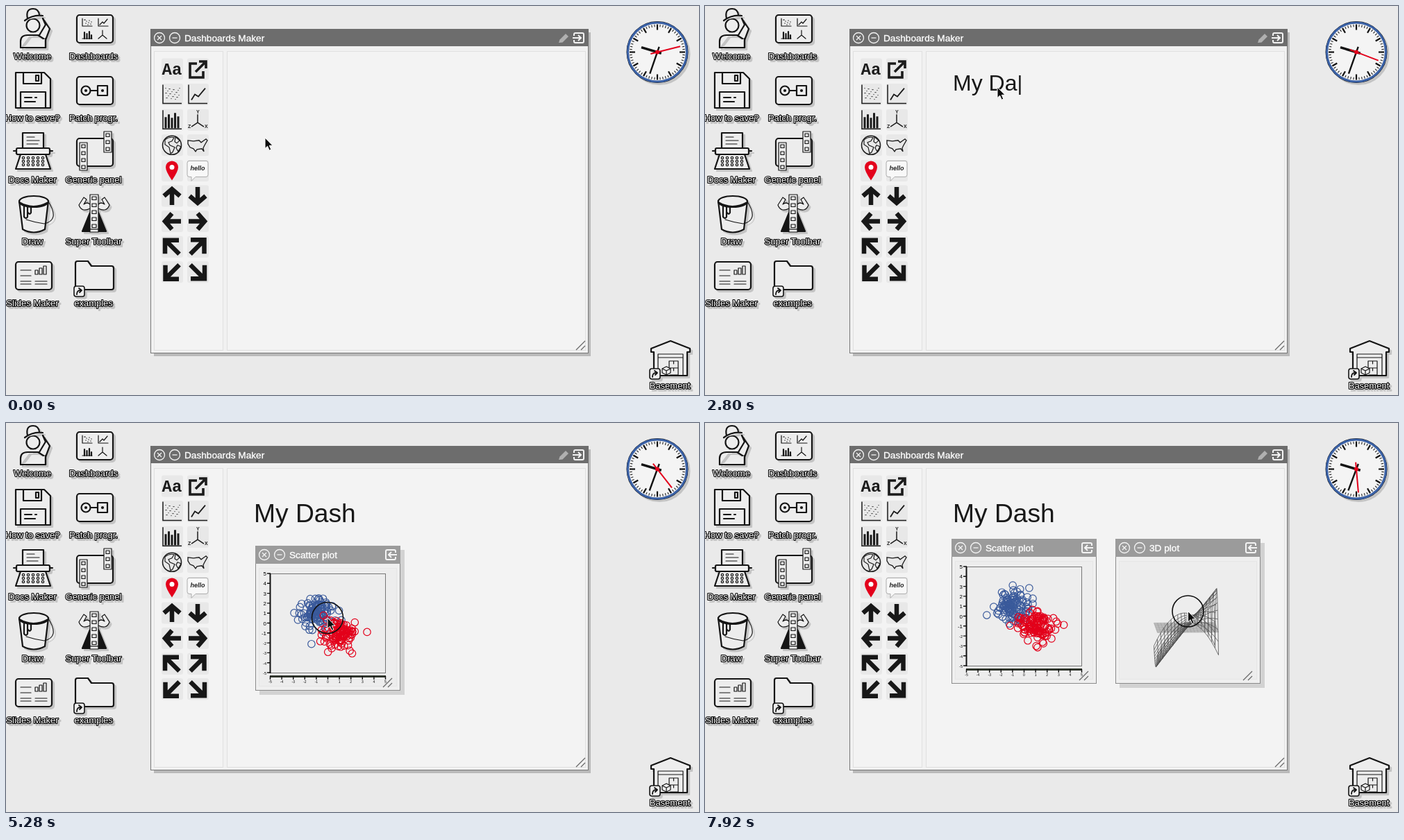
An HTML page for the animation above (8000 ms loop, 998 by 561 pixels).

```html
<!DOCTYPE html>
<html lang="en">
<head>
<meta charset="utf-8">
<title>Desktop</title>
<style>
html, body { margin: 0; width: 100%; height: 100%; overflow: hidden; background: #eaeaea; }
svg { display: block; width: 100vw; height: 100vh; }
text { font-family: "Liberation Sans", Arial, sans-serif; white-space: pre; }
.icon { fill: none; stroke: #151515; stroke-width: 2.2; stroke-linejoin: round; stroke-linecap: round; filter: drop-shadow(3px 3px 0 #c4c4c4); }
.pale { fill: #ededed; }
.thin { stroke-width: 1.2; }
.dark { fill: #151515; }
.label { font-size: 13px; text-anchor: middle; fill: #fff; stroke: #000; stroke-width: 2.2px; stroke-linejoin: round; paint-order: stroke; filter: drop-shadow(3px 3px 0 #c4c4c4); }
.title { font-size: 13.65px; fill: #fff; stroke: #fff; stroke-width: .35px; }
.glyph { fill: none; stroke: #f4f4f4; stroke-width: 1.3; }
.tool { fill: none; stroke: #1b1b1b; stroke-width: 1.5; }
.grip { stroke: #6a6a6a; stroke-width: 1.3; fill: none; }
</style>
</head>
<body>
<svg id="stage" viewBox="0 0 998 561" xmlns="http://www.w3.org/2000/svg"></svg>
<script>
const stage = document.getElementById('stage');
const $ = id => document.getElementById(id);
const range = n => [...Array(n).keys()];
const rect = (x, y, w, h, r = 0, attrs = '') =>
  `<rect x="${x}" y="${y}" width="${w}" height="${h}" rx="${r}" ${attrs}/>`;
const path = (d, attrs = '') => `<path d="${d}" ${attrs}/>`;
const circle = (x, y, r, attrs = '') => `<circle cx="${x}" cy="${y}" r="${r}" ${attrs}/>`;
const at = (x, y, body, attrs = '') => `<g transform="translate(${x} ${y})" ${attrs}>${body}</g>`;

function random(seed) {
  let s = seed * 7919 + 17;
  return () => {
    s = s + 0x6D2B79F5 | 0;
    let v = Math.imul(s ^ s >>> 15, 1 | s);
    v = v + Math.imul(v ^ v >>> 7, 61 | v) ^ v;
    return ((v ^ v >>> 14) >>> 0) / 4294967296;
  };
}

// Desktop icons, drawn around their own centre
const link = at(-29, 15, rect(0, 0, 15, 15, 3, 'class="pale" stroke-width="1.6"') +
  path('M4 12Q4 6 9 6M7 3L11 6L8 9', 'stroke-width="1.8"'));

const strip = (x, y, n, w = 11) => rect(x, y, w, n * 10, 0, 'class="pale thin"') +
  range(n).map(i => rect(x + 3, y + 3 + i * 10, w - 6, 4.5, 0, 'class="thin"')).join('');

const card = rect(-25, -20, 52, 40, 4, 'class="pale"');

const art = {
  person: path('M-18 27V18Q-18 9 -8 9H7L18 16L24 0L14 -15', 'class="pale"') +
    path('M-18 27H18V14', 'class="pale"') +
    circle(0, -5, 9.5, 'class="pale"') +
    path('M-12 -12Q0 -21 14 -19M-8 -15Q-11 -29 0 -29Q8 -29 9 -20', 'class="pale"') +
    path('M14 -15L18 -6L9 9M18 16V27', ''),
  board: card + path('M-17 -15V-4H-3M6 -15V-4H20M8 -6L12 -10L14 -8L19 -14', 'class="thin"') +
    range(9).map(i => circle(-14 + i * 29 % 11, -13 + i * 17 % 8, .7, 'class="dark" stroke="none"')).join('') +
    path('M-17 14H-3', 'class="thin"') + path('M-14 14V5M-10.500 14V7M-7 14V4M-4 14V9', '') +
    path('M12 2V9L6 14M12 9L18 14', 'class="thin"'),
  floppy: path('M-25 -26H16L25 -17V25H-25Z', 'class="pale"') +
    path('M-14 -26V-10H12V-26M4 -22V-14H8V-22ZM-18 25V2H18V25', '') +
    path('M-12 10H-2M3 10H5M-12 16H3'),
  patch: card + circle(-12, 0, 6.5) + path('M-5 0H5') + rect(5, -7, 14, 14) +
    circle(-12, 0, 1, 'class="dark"') + circle(12, 0, 1, 'class="dark"'),
  typewriter: rect(-15, -28, 30, 24, 0, 'class="pale"') +
    path('M-9 -22H2M-9 -17H9M-9 -12H7', 'class="thin"') +
    rect(-24, -6, 48, 9, 2, 'class="pale"') +
    path('M-18 3H18L25 24H-25Z', 'class="pale"') +
    range(15).map(i => circle(-14 + i % 5 * 7, 8 + Math.floor(i / 5) * 5, 1.7, 'class="thin"')).join('') +
    path('M-28 -2H-24M24 -2H28'),
  panel: card + strip(-21, -14, 4) + strip(14, -30, 3),
  bucket: path('M-20 -19L-15 22Q1 31 17 22L22 -19', 'class="pale"') +
    `<ellipse cx="1" cy="-18" rx="21" ry="8" class="pale"/>` +
    path('M-20 -17Q0 -5 22 -17M-13 -12V4Q-10 8 -8 4V-10M-8 -3Q-5 2 -3 -2V-9', '') +
    path('M22 -18Q39 9 16 14Q2 12 -10 8', 'class="thin"'),
  hero: path('M-6 -2L-17 25H-6ZM6 -2L17 25H6Z', 'class="dark"') +
    path('M-6 -8Q-18 -2 -22 -13L-15 -24L-11 -21L-15 -14Q-10 -18 -6 -14M6 -8Q18 -2 22 -13L15 -24L11 -21L15 -14Q10 -18 6 -14', 'class="pale thin"') +
    strip(-6, -28, 5, 12) + rect(-6, 22, 12, 4, 0, 'class="pale thin"'),
  slides: card + path('M-18 -8H-3M-18 0H-3M-18 8H-3M3 8H20M3 12H20M-18 12H-3', 'class="thin"') +
    path('M3 -2V-8H7V-2ZM9 -2V-11H13V-2ZM15 -2V-14H19V-2Z', 'class="thin"'),
  folder: path('M-27 19V-18Q-27 -21 -24 -21H-9L-4 -14H25Q28 -14 28 -11V17Q28 20 25 20H-27Z', 'class="pale"') + link,
  garage: path('M-28 -9V-14L0 -25L28 -14V-9H24V25H-24V-9Z', 'class="pale"') +
    path('M-18 25V-6H18V25M-18 -1H18', 'class="thin"') +
    path('M-2 4H11V24M-2 4V13M11 14H-2M4.500 4V8M4.500 14V18M-12 15L-6 12L0 15V21L-6 24L-12 21ZM-12 15L-6 18L0 15M-6 18V24M-1 24H11', 'class="thin"') +
    at(-1, 0, link)
};

const icon = (x, y, kind, label, gap = 43.5) =>
  at(x, y, art[kind], 'class="icon"') + `<text class="label" x="${x - 1}" y="${y + gap}">${label}</text>`;

const desktop = [
  ['person', 'Welcome', 'board', 'Dashboards'],
  ['floppy', 'How to save?', 'patch', 'Patch progr.'],
  ['typewriter', 'Docs Maker', 'panel', 'Generic panel'],
  ['bucket', 'Draw', 'hero', 'Super Toolbar'],
  ['slides', 'Slides Maker', 'folder', 'examples']
].map(([a, la, b, lb], i) => icon(39, 33 + i * 89, a, la) + icon(127, 33 + i * 89, b, lb)).join('') +
  icon(957, 508, 'garage', 'Basement');

// Clock
const hand = (id, d, w, color = '#111') =>
  path(d, `id="${id}" stroke="${color}" stroke-width="${w}"`);
const clock = at(938, 66.5,
  circle(0, 0, 43.5, 'fill="#f4f4f4" stroke="#111" stroke-width="2" style="filter:drop-shadow(3px 3px 0 #c4c4c4)"') +
  circle(0, 0, 42.5, 'fill="none" stroke="#3a61a6" stroke-width="3.2"') +
  range(60).map(i => path(`M0 -40V${i % 5 ? -36.5 : -32}`,
    `stroke="#111" stroke-width="${i % 5 ? 1 : 2.2}" transform="rotate(${i * 6})"`)).join('') +
  hand('hour', 'M0 6V-24', 3.6) + hand('minute', 'M0 8V-33', 2.4) +
  hand('second', 'M0 10V-34', 2, '#e3001b') + circle(0, 0, 3, 'fill="#e3001b"'));

// Windows
const buttons = at(13, 13, circle(0, 0, 7.5) + path('M-3 -3L3 3M3 -3L-3 3')) +
  at(35, 13, circle(0, 0, 7.5) + path('M-3.500 0H3.500'));
const exit = dir => `<g stroke-width="2" transform="scale(${dir} 1)">` +
  path('M-7 -3V-5Q-7 -7 -5 -7H5Q7 -7 7 -5V5Q7 7 5 7H-5Q-7 7 -7 5V3M-9 0H3M-1 -4L3 0L-1 4') + '</g>';
const grip = (x, y) => path(`M${x - 13} ${y}L${x} ${y - 13}M${x - 6} ${y}L${x} ${y - 6}`, 'class="grip"');
const edge = 'fill="#f3f3f3" stroke="#e0e0e0"';

const mainWindow = at(208, 33,
  rect(5, 5, 629, 467, 0, 'fill="#b9b9b9"') +
  rect(.5, .5, 630, 467, 0, 'fill="#f1f1f1" stroke="#777"') +
  rect(0, 0, 631, 25, 0, 'fill="#6d6d6d"') +
  rect(5.5, 32.5, 99, 431, 0, edge) + rect(110.5, 32.5, 516, 431, 0, edge) +
  `<g class="glyph">${buttons}${at(617, 13, exit(1))}</g>` +
  path('M588 20L589.500 15.500L598 7L602 11L593.500 19.500Z', 'fill="#b0b0b0"') +
  `<text class="title" x="49" y="18">Dashboards Maker</text>` + grip(626, 463));

const miniWindow = (id, title, body) => `<g id="${id}">` +
  rect(6, 6, 209, 209, 0, `id="${id}Shade" fill="#d2d2d2"`) +
  rect(.5, .5, 208, 208, 0, 'fill="#efefef" stroke="#8a8a8a"') +
  rect(0, 0, 209, 26, 0, 'fill="#9b9b9b"') +
  rect(5.5, 32.5, 198, 170, 0, 'fill="#ededed" stroke="#e6e6e6"') +
  `<g class="glyph">${buttons}${at(195, 13, exit(-1))}</g>` +
  `<text class="title" x="49" y="18">${title}</text>${body}${grip(197, 204)}</g>`;

const axes = rect(21.5, 40.5, 166, 143, 0, 'fill="none" stroke="#777"') +
  path('M21.500 40V184', 'stroke="#111" stroke-width="2"') +
  path('M21 188.500H188', 'stroke="#30352c" stroke-width="3"') +
  range(11).map(i => {
    const x = 21.5 + i * 16.6, y = 40 + i * 14.3;
    return path(`M17 ${y}H22M${x} 188V193`, 'stroke="#111" stroke-width="1.4"') +
      `<text x="16" y="${y + 3}" font-size="${i < 7 ? 8 : 5.5}" text-anchor="end">${5 - i}</text>` +
      `<text x="${x}" y="197.500" font-size="5" text-anchor="middle">${i - 5}</text>`;
  }).join('');

// Toolbar
const arrow = (turn, diagonal) => path(diagonal
  ? 'M-10 10V-9.500H10M-9 -9L10.500 10.500' : 'M-11.500 0L0 -10L11.500 0M0 -9V13',
  `stroke-width="6.500" stroke="#171717" transform="rotate(${turn})"`);
const plotDots = range(26).map(i => circle(-9 + i * 37 % 21, -9 + i * 23 % 17, .7, 'fill="#222" stroke="none"')).join('');
const frame = path('M-13 -14V13H14');
const tools = [
  `<text y="8" text-anchor="middle" font-weight="bold" fill="#1b1b1b" stroke="none" style="font:bold 24px 'Liberation Mono',monospace">Aa</text>`,
  path('M-1 -8H-11V12H8V3M-3 4L10 -9M2 -11H12V-1', 'stroke-width="3.600"'),
  frame + plotDots,
  frame + path('M-9 8L-4 0L1 3L11 -9', 'stroke-width="1.800"'),
  frame + path('M-9 12V-4M-4.500 12V-8M0 12V-3M4.500 12V-10M9 12V-5', 'stroke-width="3"'),
  path('M0 -8V4L-9 10M0 4L9 10') +
    `<g fill="#222" stroke="none" font-size="7" font-weight="bold"><text x="-2" y="-9">Y</text><text x="-14" y="12">Z</text><text x="10" y="12">X</text></g>`,
  circle(0, 0, 13.5) + path('M-10 -8Q-3 -13 3 -11L0 -6L-5 -4L-3 0L4 3L1 10L-2 12L-4 3L-10 -1ZM5 -12L11 -7L7 -3L4 -5ZM8 0L13 2L9 9L6 4Z', 'stroke-width="1.200"'),
  path('M-14 -7L-6 -6L2 -7L5 -4L12 -9L14 -7L10 0L8 4L9 9L6 5L-1 6L-3 9L-6 5L-11 3L-14 -2Z', 'stroke-width="1.300"'),
  path('M0 14Q-9 1 -9 -5A9 9 0 0 1 9 -5Q9 1 0 14Z', 'fill="#e3001b" stroke="none"') + circle(0, -5, 3.5, 'fill="#fff" stroke="none"'),
  path('M-12 -14H12Q15 -14 15 -11V6Q15 9 12 9H-3L-9 15V9H-12Q-15 9 -15 6V-11Q-15 -14 -12 -14Z', 'fill="#f8f8f8" stroke="#aaa" stroke-width="1"') +
    `<text y="0" text-anchor="middle" font-size="9" font-weight="bold" font-style="italic" fill="#222" stroke="none">hello</text>`,
  ...[0, 180, 270, 90].map(a => arrow(a)),
  ...[0, 90, 270, 180].map(a => arrow(a, true))
];
const toolSpot = i => [239 + i % 2 * 37, 91 + Math.floor(i / 2) * 36.6];
const toolbar = tools.map((body, i) => at(...toolSpot(i),
  rect(-15, -15.5, 31, 31, 3, `id="cell${i}" stroke="none"`) + body, 'class="tool"')).join('');

stage.innerHTML = rect(0, 0, 998, 561, 0, 'fill="#eaeaea"') + desktop + clock + mainWindow + toolbar +
  '<g id="note"></g>' +
  miniWindow('scatter', 'Scatter plot', axes + '<g id="dots" fill="none" stroke-width="1.200"></g>') +
  miniWindow('plot', '3D plot', '<path id="floor" fill="none" stroke="#8d8d8d" stroke-width=".5"/><path id="mesh" fill="none" stroke="#4d4d4d" stroke-width=".75"/>') +
  `<circle id="ring" r="22.500" fill="none" stroke="#111" stroke-width="1.600"/>` +
  path('M0 0V15.500L3.600 12.200L6.200 18.200L8.800 17L6.300 11.300H11Z', 'id="pointer" fill="#0c0c0c" stroke="#fff" stroke-width="1"');

// Pointer route: time, x, y
const route = [
  [0, 373, 190], [480, 241, 92], [640, 241, 92], [1200, 430, 129], [1360, 421, 117],
  [3120, 421, 117], [3440, 460, 250], [3680, 460, 250], [4160, 273, 176], [4400, 240, 129],
  [4560, 240, 129], [5120, 460, 278], [5280, 463, 281], [6080, 459, 273], [6160, 459, 271],
  [6320, 459, 271], [6720, 276, 166], [6880, 276, 166], [7360, 515, 223], [7760, 690, 270],
  [7920, 695.5, 271.5], [8000, 695.5, 271.5]
];
function pointerAt(t) {
  const i = Math.max(1, route.findIndex(k => k[0] >= t));
  const [t0, x0, y0] = route[i - 1], [t1, x1, y1] = route[i];
  const k = (t - t0) / (t1 - t0), e = k * k * (3 - 2 * k);
  return [x0 + (x1 - x0) * e, y0 + (y1 - y0) * e];
}

const DRAG = { note: [640, 1200], scatter: [4560, 6200], plot: [6880, 8000] };
const dragging = (id, t) => t >= DRAG[id][0] && t < DRAG[id][1];

function noteMarkup(t) {
  if (t < DRAG.note[0]) return '';
  const [x, y] = pointerAt(Math.min(t, DRAG.note[1]));
  const left = x - 73, top = y - 37;
  const line = (s, dy, size, fill) =>
    `<text x="${left}" y="${top + dy}" font-size="${size}" fill="${fill}">${s}</text>`;
  if (t < 1840) {
    const picked = t >= 1520, fill = picked ? '#fff' : '#181818';
    return (picked ? path(`M${left} ${top - 1}h147v38h-82v37h-65Z`, 'fill="#404045"') : '') +
      line('insert text', 30, 32, fill) + line('here', 68, 32, fill) +
      (picked ? path('M427 90V118', 'stroke="#111"') : '');
  }
  if (t >= 3600) return line('My Dash', 51, 37.2, '#181818');
  const count = Math.min(7, 1 + Math.floor((t - 1840) / 200));
  const caret = Math.floor(t / 480) % 2 ? '<tspan font-size="30" font-weight="100">|</tspan>' : '';
  return line('My Dash'.slice(0, count) + caret, 30, 32, '#181818');
}

let lastBatch = -1;
function drawDots(batch) {
  if (batch === lastBatch) return;
  lastBatch = batch;
  const rnd = random(batch);
  const cloud = (mx, my, sd, color) => range(110).map(() => {
    const r = sd * Math.sqrt(-2 * Math.log(1 - rnd())), a = rnd() * 2 * Math.PI;
    return circle((104.5 + 16.6 * (mx + r * Math.cos(a))).toFixed(1),
      (111.5 - 14.3 * (my + r * Math.sin(a))).toFixed(1), 5.2, `stroke="${color}"`);
  }).join('');
  $('dots').innerHTML = cloud(-1, 1, .85, '#3a5a9b') + cloud(1, -1, .76, '#e3001b');
}

const wave = (u, v) => 56 * v * (1 - u * u) + u * u * (14 - 47 * v * v);
function grid(turn, height) {
  const n = 18, c = Math.cos(turn), s = Math.sin(turn);
  const spot = (i, j) => {
    const u = i / n * 2 - 1, v = j / n * 2 - 1;
    const x = 102 + 44 * (u * c + v * s), y = 128 + 7 * (u * s - v * c) - height(u, v);
    return x.toFixed(1) + ' ' + y.toFixed(1);
  };
  const steps = range(n + 1);
  return steps.map(i => 'M' + steps.map(j => spot(i, j)).join('L') +
    'M' + steps.map(j => spot(j, i)).join('L')).join('');
}

function placeWindow(id, t) {
  const [start, end] = DRAG[id], shown = t >= start;
  $(id).style.display = shown ? '' : 'none';
  if (!shown) return;
  const [x, y] = pointerAt(Math.min(t, end));
  $(id).setAttribute('transform', `translate(${Math.round(x - 104.5)} ${Math.round(y - 104.5)})`);
  $(id + 'Shade').style.display = dragging(id, t) ? '' : 'none';
}

function draw(t) {
  const turn = (id, a) => $(id).setAttribute('transform', `rotate(${a})`);
  turn('second', 76 + t * .0125);
  turn('minute', 199 + t * .0002);
  turn('hour', 286.6);

  const [x, y] = pointerAt(t), move = `translate(${x} ${y})`;
  const held = Object.keys(DRAG).some(id => dragging(id, t));
  $('pointer').setAttribute('transform', move);
  $('ring').setAttribute('transform', move);
  $('ring').style.display = held ? '' : 'none';

  // The hover shade trails the pointer by one step
  const [hx, hy] = pointerAt(Math.max(0, t - 80));
  tools.forEach((_, i) => {
    const [cx, cy] = toolSpot(i);
    const over = !held && Math.abs(hx - cx) < 16 && Math.abs(hy - cy) < 16;
    $('cell' + i).setAttribute('fill', over ? '#9a9a9a' : '#e8e8e8');
  });

  $('note').innerHTML = noteMarkup(t);
  placeWindow('scatter', t);
  placeWindow('plot', t);
  if (t >= DRAG.scatter[0]) drawDots(Math.floor(t / 480));
  if (t >= DRAG.plot[0]) {
    const a = Math.PI / 4 + (t - 7360) * .0013;
    $('floor').setAttribute('d', grid(a, () => 0));
    $('mesh').setAttribute('d', grid(a, wave));
  }
}

const begin = performance.now();
function tick() {
  const t = Math.max(0, performance.now() - begin) % 8000;
  draw(Math.floor(t / 80) * 80);
  requestAnimationFrame(tick);
}
tick();
</script>
</body>
</html>
```
